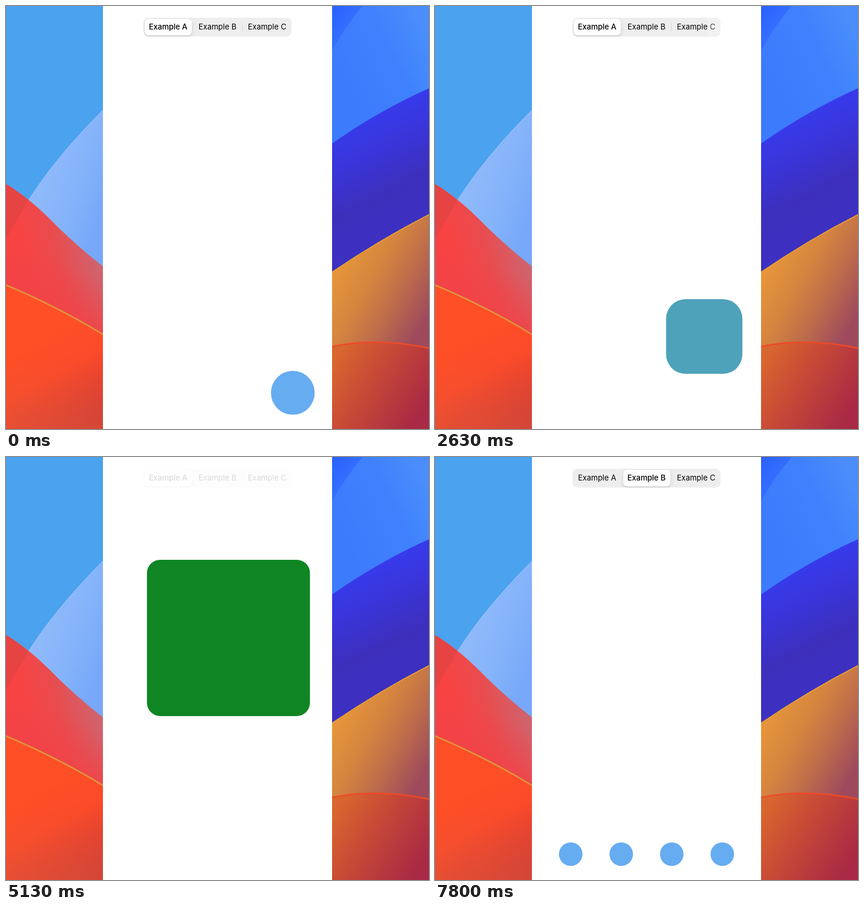
Animation of 720x720 px, one loop 8000 ms. Source, as an HTML page:

```html
<!DOCTYPE html>
<html lang="en">
<head>
<meta charset="utf-8">
<title>Morphing button</title>
<style>
  html, body { margin: 0; width: 100%; height: 100%; overflow: hidden; background: #fff; }
  #stage { position: relative; width: 720px; height: 720px; overflow: hidden; }
  svg { position: absolute; left: 0; top: 0; }
  #tabs {
    position: absolute; left: 234px; top: 20px; width: 252px; height: 31.5px;
    border-radius: 8px; background: #eeeeef; overflow: hidden;
    font: 400 13px/31.5px Inter, Roboto, sans-serif; color: #000; text-align: center;
  }
  #tabs span { position: absolute; top: 0; width: 84px; white-space: nowrap; }
  #tabs span.on { font-weight: 500; }
  #thumb {
    position: absolute; left: 2px; top: 2px; width: 79.5px; height: 27.5px;
    border-radius: 6.5px; background: #fff;
    box-shadow: 0 3px 8px rgba(0,0,0,.12), 0 3px 1px rgba(0,0,0,.04);
  }
  #divider { position: absolute; left: 168px; top: 8px; width: 1px; height: 15.5px; background: #dcdcdf; }
</style>
</head>
<body>
<div id="stage">
  <svg width="720" height="720" viewBox="0 0 720 720">
    <defs>
      <linearGradient id="ice" gradientUnits="userSpaceOnUse" x1="60" y1="290" x2="170" y2="330">
        <stop offset="0" stop-color="#8fbafa"/><stop offset=".5" stop-color="#86b4fa"/>
        <stop offset="1" stop-color="#78a8f9"/>
      </linearGradient>
      <linearGradient id="red" gradientUnits="userSpaceOnUse" x1="35" y1="440" x2="165" y2="405">
        <stop offset="0" stop-color="#f84343"/><stop offset=".4" stop-color="#ea4b4d"/>
        <stop offset="1" stop-color="#c86a76"/>
      </linearGradient>
      <linearGradient id="redLow" gradientUnits="userSpaceOnUse" x1="150" y1="460" x2="115" y2="535">
        <stop offset="0" stop-color="#f04348" stop-opacity="0"/>
        <stop offset="1" stop-color="#f04348" stop-opacity=".8"/>
      </linearGradient>
      <linearGradient id="flame" gradientUnits="userSpaceOnUse" x1="75" y1="560" x2="160" y2="720">
        <stop offset="0" stop-color="#ff4f26"/><stop offset=".35" stop-color="#fa4a2a"/>
        <stop offset="1" stop-color="#c23236"/>
      </linearGradient>
      <linearGradient id="flameLow" gradientUnits="userSpaceOnUse" x1="0" y1="600" x2="0" y2="720">
        <stop offset="0" stop-color="#e8603a" stop-opacity="0"/>
        <stop offset="1" stop-color="#e8603a" stop-opacity=".45"/>
      </linearGradient>
      <linearGradient id="azure" gradientUnits="userSpaceOnUse" x1="570" y1="130" x2="720" y2="60">
        <stop offset="0" stop-color="#3d7bfd"/><stop offset=".6" stop-color="#3f81fd"/>
        <stop offset="1" stop-color="#4a8dfb"/>
      </linearGradient>
      <linearGradient id="deep" gradientUnits="userSpaceOnUse" x1="555" y1="0" x2="592" y2="28">
        <stop offset="0" stop-color="#2a60ff"/><stop offset="1" stop-color="#3570fe"/>
      </linearGradient>
      <linearGradient id="indigo" gradientUnits="userSpaceOnUse" x1="605" y1="200" x2="675" y2="340">
        <stop offset="0" stop-color="#373aea"/><stop offset=".4" stop-color="#3a34d6"/>
        <stop offset=".8" stop-color="#3d2fbc"/><stop offset="1" stop-color="#3d30c0"/>
      </linearGradient>
      <linearGradient id="gold" gradientUnits="userSpaceOnUse" x1="562" y1="455" x2="710" y2="540">
        <stop offset="0" stop-color="#e6953a"/><stop offset=".35" stop-color="#d4843f"/>
        <stop offset=".65" stop-color="#bd6c4b"/><stop offset="1" stop-color="#9e4a5c"/>
      </linearGradient>
      <linearGradient id="wine" gradientUnits="userSpaceOnUse" x1="555" y1="610" x2="700" y2="700">
        <stop offset="0" stop-color="#d8662f"/><stop offset=".4" stop-color="#c84a36"/>
        <stop offset="1" stop-color="#a92a44"/>
      </linearGradient>
    </defs>

    <rect width="165" height="720" fill="#4ba2ee"/>
    <path d="M165 177Q85 257 38 331L100 420L165 460Z" fill="url(#ice)"/>
    <path d="M165 177Q85 257 38 331" fill="none" stroke="#9cc4fb"/>
    <path id="redShape" d="M0 303Q42 328 88 376Q126 413 165 443V560L0 480Z" fill="url(#red)"/>
    <path d="M0 303Q42 328 88 376Q126 413 165 443V560L0 480Z" fill="url(#redLow)"/>
    <path d="M0 303Q20 315 38 331L0 396Z" fill="#dd4443" opacity=".6"/>
    <path d="M0 474Q92 513 165 558V720H0Z" fill="url(#flame)"/>
    <path d="M0 474Q92 513 165 558V720H0Z" fill="url(#flameLow)"/>
    <path d="M0 475Q92 514 165 559" fill="none" stroke="#e0953c" stroke-width="2.5"/>

    <rect x="555" width="165" height="260" fill="url(#azure)"/>
    <path d="M555 0H607Q575 38 555 76Z" fill="url(#deep)"/>
    <path d="M555 234Q635 178 720 140V400L555 470Z" fill="url(#indigo)"/>
    <path d="M555 453Q636 398 720 355V600H555Z" fill="url(#gold)"/>
    <path d="M555 453Q636 398 720 355" fill="none" stroke="#e3a034" stroke-width="1.8"/>
    <path d="M555 579Q635 563 720 582V720H555Z" fill="url(#wine)"/>
    <path d="M555 579.5Q635 563.5 720 582.5" fill="none" stroke="#ec4a28" stroke-width="2.5"/>

    <rect x="165" width="390" height="720" fill="#fff"/>
    <rect id="card"/>
    <g id="dots" fill="#66acf1">
      <circle cx="231" cy="676" r="20"/><circle cx="317" cy="676" r="20"/>
      <circle cx="403" cy="676" r="20"/><circle cx="489" cy="676" r="20"/>
    </g>
  </svg>
  <div id="tabs">
    <div id="divider"></div>
    <div id="thumb"></div>
    <span style="left:0">Example A</span>
    <span style="left:84px">Example B</span>
    <span style="left:168.5px">Example C</span>
  </div>
</div>
<script>
const LOOP = 8000, SWITCH = 7350;
const $ = id => document.getElementById(id);
const card = $('card'), dots = $('dots'), tabs = $('tabs'), thumb = $('thumb'), divider = $('divider');
const labels = tabs.querySelectorAll('span');
const clamp = v => Math.min(1, Math.max(0, v));
const mix = (a, b, p) => a + (b - a) * p;

// Finger scrubbing: [time, collapsed fraction]
const drag = [
  [1540, 0], [1770, .255], [2370, .635], [2630, .766], [3200, .969], [3240, .98], [3670, .98],
  [3740, .992], [4270, .632], [4500, .484], [5130, .146], [5330, .037], [5630, 0], [6180, 0]
];
const slope = i => (drag[i + 1][1] - drag[i][1]) / (drag[i + 1][0] - drag[i][0]);
function tangent(i) {
  if (i === 0 || i === drag.length - 1) return 0;
  const a = slope(i - 1), b = slope(i);
  return a * b > 0 ? 2 * a * b / (a + b) : 0;
}
function dragged(t) {
  const i = drag.findIndex((key, n) => t < drag[n + 1][0]);
  const [t0, p0] = drag[i], [t1, p1] = drag[i + 1];
  const h = t1 - t0, u = (t - t0) / h, v = 1 - u;
  return p0 * (1 + 2 * u) * v * v + p1 * u * u * (3 - 2 * u)
    + h * u * v * (tangent(i) * v - tangent(i + 1) * u);
}

// 1 = small blue circle, 0 = large green card
function collapsed(t) {
  if (t < 150) return 1;
  if (t < 1540) {
    const s = (t - 150) / 1000, w = 6.6;
    return Math.exp(-.75 * w * s) * (Math.cos(w * s) + .75 * Math.sin(w * s));
  }
  if (t < 6180) return dragged(t);
  const x = 12 * (t - 6180) / 1000;
  return t < 6930 ? 1 - (1 + x) * Math.exp(-x) : 1;
}

function drawCard(p) {
  const x = mix(204, 451, p), y = mix(99, 621, p), c = clamp(p);
  const box = {
    x, y, width: mix(516, 525.4, p) - x, height: mix(397.5, 695.8, p) - y, rx: mix(20, 37.3, p),
    fill: `rgb(${mix(0, 102, c)},${mix(128, 172, c)},${mix(0, 241, c)})`
  };
  for (const name in box) card.setAttribute(name, box[name]);
}

function drawTabs(t, p) {
  const c = clamp(p), edge = 165 + 390 * c - 234;
  const mask = `linear-gradient(90deg, #000 ${edge}px, rgba(0,0,0,${c}) ${edge}px)`;
  tabs.style.webkitMaskImage = tabs.style.maskImage = mask;
  const u = clamp((t - SWITCH) / 400), slide = 1 - (1 - u) ** 3;
  thumb.style.transform = `translateX(${84.5 * slide}px)`;
  divider.style.opacity = 1 - slide;
  const active = t < SWITCH ? 0 : 1;
  labels.forEach((label, i) => label.classList.toggle('on', i === active));
}

function frame() {
  const t = performance.now() % LOOP, p = collapsed(t), split = t >= SWITCH;
  drawCard(p);
  drawTabs(t, p);
  card.style.display = split ? 'none' : '';
  dots.style.display = split ? '' : 'none';
  requestAnimationFrame(frame);
}
frame();
</script>
</body>
</html>
```
